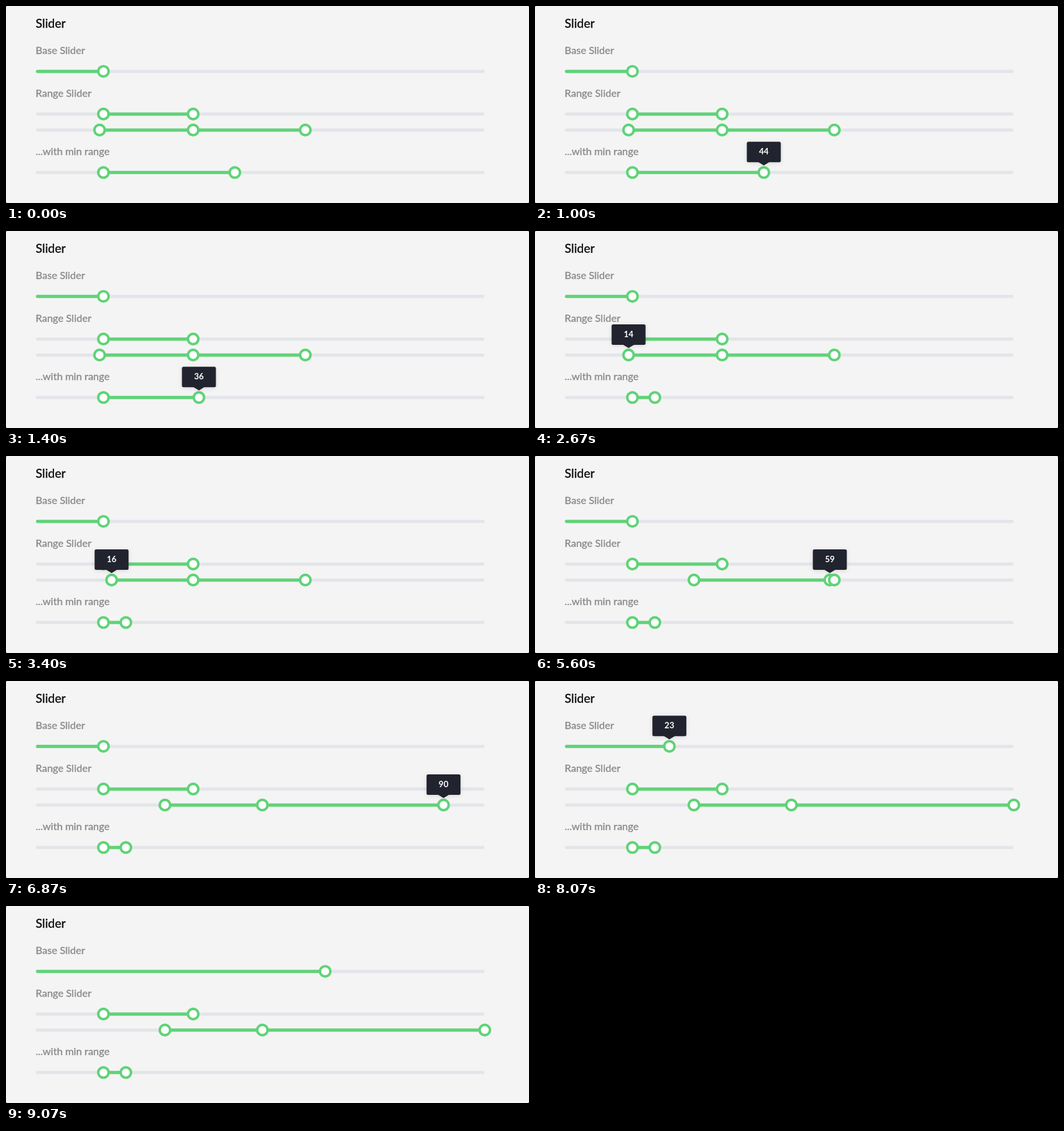
Recreate the animation shown at these times as an HTML page. Size 816 by 308 pixels, loop 9390 ms.

```html
<!DOCTYPE html>
<html lang="en">
<head>
<meta charset="utf-8">
<title>Slider</title>
<style>
  html, body { margin: 0; width: 100%; height: 100%; overflow: hidden; background: #555; }
  svg { display: block; width: 816px; height: 308px; }
  text { font-family: Lato, "Open Sans", sans-serif; }
  .title { font-size: 19px; fill: #0c0c0c; stroke: #0c0c0c; stroke-width: .35px; }
  .label { font-size: 16px; fill: #8a8a8a; stroke: #8a8a8a; stroke-width: .35px; }
  .knob { fill: #fff; stroke: #5fd377; stroke-width: 3.9px; }
  .tip { filter: drop-shadow(0 1px 3px rgba(0, 0, 0, .12)); }
  .tip text { font-size: 13px; font-weight: 700; fill: #fff; text-anchor: middle; }
</style>
</head>
<body>
<svg id="stage" viewBox="0 0 816 308">
  <rect width="816" height="308" rx="2" fill="#f4f4f4"/>
  <text class="title" x="46.3" y="34">Slider</text>
  <text class="label" x="46.3" y="75">Base Slider</text>
  <text class="label" x="46.3" y="142">Range Slider</text>
  <text class="label" x="46.3" y="233">...with min range</text>
</svg>
<script>
const LOOP = 9390, STEP = 200 / 3;
const LEFT = 47, WIDTH = 700;
const stage = document.getElementById('stage');

// path: [time, x] points of a knob; tip: fade-in start, end, fade-out start, end
const rows = [
  { y: 102.2, fromStart: true, knobs: [
    { path: [[8000, 152], [8400, 498]], tip: [7800, 8000, 8400, 8600] }
  ] },
  { y: 168.9, knobs: [
    { path: [[0, 152]] },
    { path: [[0, 292]] }
  ] },
  { y: 193.9, knobs: [
    { path: [[2933, 146], [3133, 59.5], [3200, 59.5], [3467, 200], [3600, 292],
             [3667, 285.5], [3867, 285.5], [4200, 248]],
      tip: [2467, 2666, 4400, 4600] },
    { path: [[5333, 292], [5600, 460], [5867, 460], [6133, 400]],
      tip: [4800, 5066, 6200, 6333] },
    { path: [[6800, 467], [6866, 682], [6933, 747]],
      tip: [6200, 6333, 6933, 7133] }
  ] },
  { y: 260.3, knobs: [
    { path: [[0, 152]], tip: [1800, 2000, 2200, 2333] },
    { path: [[1000, 357], [1067, 520], [1133, 616.5], [1200, 616.5], [1267, 560],
             [1333, 420], [1400, 301], [1467, 220], [1533, 187]],
      tip: [867, 1000, 2200, 2333] }
  ] }
];

function add(parent, name, attrs) {
  const el = document.createElementNS('http://www.w3.org/2000/svg', name);
  for (const key in attrs) el.setAttribute(key, attrs[key]);
  parent.appendChild(el);
  return el;
}

function bar(y, fill) {
  return add(stage, 'rect', { x: LEFT - .3, y: y - 2.5, width: WIDTH, height: 5, rx: 2.5, fill });
}

for (const row of rows) {
  bar(row.y, '#e4e5ea');
  row.fill = bar(row.y, '#5fd377');
  for (const knob of row.knobs) {
    knob.group = add(stage, 'g', {});
    add(knob.group, 'circle', { class: 'knob', r: 8.1 });
    if (!knob.tip) continue;
    knob.bubble = add(knob.group, 'g', { class: 'tip' });
    knob.box = add(knob.bubble, 'rect', { y: -48, height: 32, rx: 2.5, fill: '#21242e' });
    add(knob.bubble, 'path', { d: 'M-9-16.5H9L0-11Z', fill: '#21242e' });
    knob.text = add(knob.bubble, 'text', { y: -28.2 });
  }
}

const ramp = (t, a, b) => Math.min(1, Math.max(0, (t - a) / (b - a)));

function along(path, t) {
  let x = path[0][1];
  for (let i = 1; i < path.length; i++) {
    const [t0, x0] = path[i - 1], [t1, x1] = path[i];
    if (t > t0) x = x0 + (x1 - x0) * ramp(t, t0, t1);
  }
  return x;
}

function drawTip(knob, x, t) {
  const [a, b, c, d] = knob.tip;
  const alpha = ramp(t, a, b) - ramp(t, c, d);
  knob.bubble.setAttribute('opacity', alpha);
  knob.bubble.setAttribute('visibility', alpha > 0 ? 'visible' : 'hidden');
  const value = String(Math.floor((x - LEFT) / WIDTH * 100 + .01));
  const width = 38 + 7.5 * value.length;
  knob.box.setAttribute('x', -width / 2);
  knob.box.setAttribute('width', width);
  knob.text.textContent = value;
}

function draw(t) {
  for (const row of rows) {
    const xs = row.knobs.map(knob => along(knob.path, t));
    const from = row.fromStart ? LEFT - .3 : xs[0];
    row.fill.setAttribute('x', from);
    row.fill.setAttribute('width', xs[xs.length - 1] - from);
    row.knobs.forEach((knob, i) => {
      knob.group.setAttribute('transform', `translate(${xs[i]} ${row.y})`);
      if (knob.tip) drawTip(knob, xs[i], t);
    });
  }
}

// The picture advances 15 times a second.
function tick() {
  const t = performance.now() % LOOP;
  draw(Math.floor((t + 4) / STEP) * STEP);
  requestAnimationFrame(tick);
}
tick();
</script>
</body>
</html>
```
